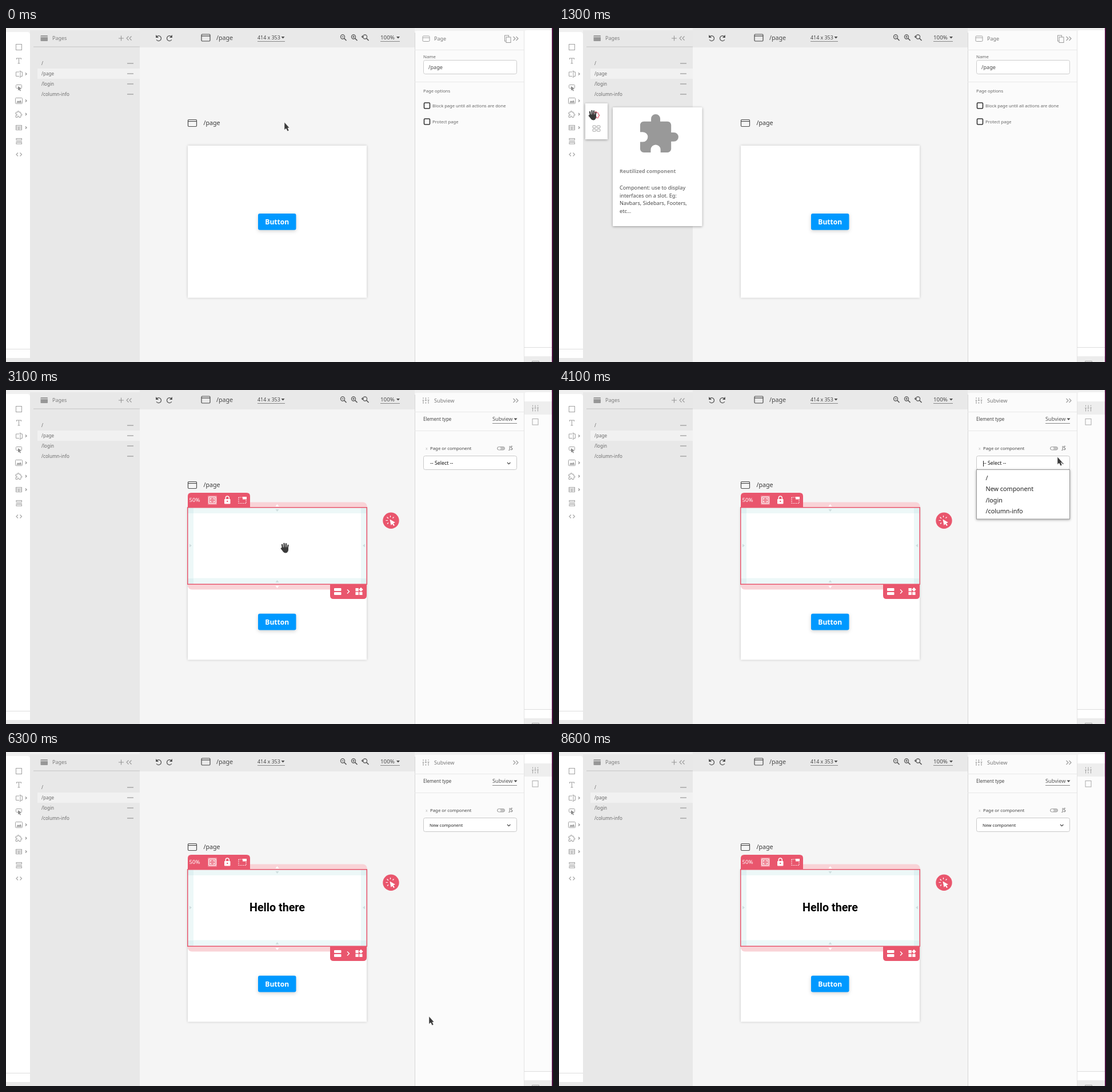
An HTML page for the animation above (9 s loop, 957 by 585 pixels).

```html
<!DOCTYPE html>
<html lang="en">
<head>
<meta charset="utf-8">
<title>Page builder</title>
<style>
  html, body { margin: 0; width: 100%; height: 100%; overflow: hidden; background: #f5f5f5; }
  svg { display: block; width: 100vw; height: 100vh; }
  text { font-family: "Noto Sans", "Open Sans", sans-serif; white-space: pre; }
  .card { filter: drop-shadow(0 0 2px rgba(0,0,0,.2)); }
  .pop { filter: drop-shadow(0 1px 2px rgba(0,0,0,.35)); }
  .lift { filter: drop-shadow(0 2px 3px rgba(0,0,0,.18)); }
</style>
</head>
<body>
<svg id="stage" viewBox="0 0 957 585"></svg>
<script>
const RED = '#e9566d', GRAY = '#a2a2a2', DARK = '#4a4a4a';
const LOOP = 9000, STEP = 100;

const rect = (x, y, w, h, fill, extra = '') =>
  `<rect x="${x}" y="${y}" width="${w}" height="${h}" fill="${fill}" ${extra}/>`;
const box = (x, y, w, h, stroke, sw = 1, extra = '') =>
  rect(x, y, w, h, 'none', `stroke="${stroke}" stroke-width="${sw}" ${extra}`);
const circle = (x, y, r, fill, extra = '') => `<circle cx="${x}" cy="${y}" r="${r}" fill="${fill}" ${extra}/>`;
const fillPath = (d, fill, extra = '') => `<path d="${d}" fill="${fill}" ${extra}/>`;
const line = (d, stroke = GRAY, sw = 1, extra = '') =>
  `<path d="${d}" fill="none" stroke="${stroke}" stroke-width="${sw}" ${extra}/>`;
const text = (x, y, size, str, fill = '#555', weight = 400, extra = '') =>
  `<text x="${x}" y="${y}" font-size="${size}" fill="${fill}" font-weight="${weight}" ${extra}>${str}</text>`;
const at = (x, y, body, scale = 1) => `<g transform="translate(${x} ${y}) scale(${scale})">${body}</g>`;
const group = (id, body) => `<g id="${id}">${body}</g>`;
const caret = (x, y) => fillPath(`M${x - 3} ${y - 1.5}h6l-3 3.5z`, DARK);

const PUZZLE = 'M20.5 11H19V7c0-1.1-.9-2-2-2h-4V3.5a2.5 2.5 0 0 0-5 0V5H4c-1.1 0-2 .9-2 2v3.8h1.5' +
  'a2.7 2.7 0 0 1 0 5.4H2V20c0 1.1.9 2 2 2h3.8v-1.5a2.7 2.7 0 0 1 5.4 0V22H17c1.1 0 2-.9 2-2v-4h1.5a2.5 2.5 0 0 0 0-5z';
const puzzle = (x, y, color) => at(x, y, line(PUZZLE, color, 2), .52);

const pageIcon = (x, y, w, h, color, sw = 1.2) =>
  box(x, y, w, h, color, sw, 'rx="1.5"') + line(`M${x} ${y + 3}h${w}`, color, sw);
const sliders = (x, y, color) => line(
  `M${x + 1} ${y}v2.5M${x + 1} ${y + 5}v6M${x + 5.5} ${y}v5.5M${x + 5.5} ${y + 8}v3M${x + 10} ${y}v2M${x + 10} ${y + 4.5}v6.5` +
  `M${x - .5} ${y + 5}h3M${x + 4} ${y + 5.5}h3M${x + 8.5} ${y + 4.5}h3`, color, 1);
const chevrons = (x, y, dir) =>
  line(`M${x} ${y - 3.5}l${3.5 * dir} 3.5l${-3.5 * dir} 3.5m${5 * dir} -7l${3.5 * dir} 3.5l${-3.5 * dir} 3.5`, '#999', 1.1);

function rail() {
  const more = y => line(`M34 ${y - 2}l2 2l-2 2`, '#888', 1.1);
  return rect(0, 0, 42, 585, '#f0f0f0') +
    fillPath('M0 7H37Q42 7 42 12V578H0z', '#fff') +
    line('M0 562.5H42', '#ddd') + rect(0, 578, 42, 7, '#e9e9e9') +
    box(17.5, 28.5, 10, 10, GRAY) +
    line('M18.5 55V53H26.5V55M22.5 53V62M20.5 62H24.5', GRAY, 1.1) +
    line('M23 77H17.5V84.5H23M25 75.5V86M23.5 75.5H26.5M23.5 86H26.5M26 77H28.5V84.5H26') + more(80.5) +
    box(17.5, 99.5, 10, 6, GRAY, 1, 'rx="1"') + fillPath('M21 102L27 106L24.5 107L26 110L24.5 110.5L23 108L21 109.5z', '#8c8c8c') +
    box(16.5, 122.5, 12, 10, GRAY, 1, 'rx="1"') + fillPath('M18 131L21 127L23 129L25 126L27.5 131z', GRAY) + more(127.5) +
    puzzle(16, 145, GRAY) + more(151) +
    box(17.5, 170.5, 10, 8, GRAY) + line('M17.5 173H27.5M17.5 175.7H27.5M22.5 173V178.5') + more(174.5) +
    box(18, 193.5, 9.5, 2.5, GRAY) + line('M17.5 198.5H28') + box(18, 200.5, 9.5, 2.5, GRAY) +
    line('M21 218.5L18 221.5L21 224.5M24.5 218.5L27.5 221.5L24.5 224.5', GRAY, 1.1);
}

function pagesPanel() {
  const rows = ['/', '/page', '/login', '/column-info'].map((name, i) => {
    const y = 62 + 18 * i;
    return (i === 1 ? rect(55, 71, 179, 18, '#f1f1f1') : '') +
      text(62, y + 3, 8.1, name, '#6c6c6c') + line(`M212 ${y}H223`, '#858585');
  }).join('');
  return rect(42, 0, 192, 585, '#e8e8e8') + rect(0, 0, 234, 4, '#f0f0f0') + rect(48, 32, 186, 2, '#d6d6d6') +
    rect(60.5, 13, 12.5, 10, '#979797', 'rx="1"') + line('M60.5 15.5H73', '#e8e8e8') +
    text(81, 21.3, 9, 'Pages', '#7c7c7c') + line('M197 18H206M201.5 13.5V22.5', '#959595', 1.1) +
    chevrons(219.5, 18, -1) + rows;
}

function toolbar() {
  const lens = (x, mark) => circle(x, 15.5, 3.6, 'none', `stroke="${DARK}" stroke-width="1.1"`) +
    line(`M${x + 2.5} 18l4 4`, DARK, 1.4) + line(mark, DARK, .9);
  const turn = line('M-3.3 -2.5A4.5 4.5 0 1 1 -3.8 3', DARK, 1.2) + fillPath('M-4.8 -5.5V-.5H0z', DARK);
  return rect(234, 0, 481, 34, '#e9e9e9') + at(267, 17.5, turn) +
    `<g transform="translate(286 17.5) scale(-1 1)">${turn}</g>` +
    pageIcon(342, 11, 15, 12, DARK) + text(368, 20.5, 10.7, '/page', DARK) +
    text(440, 20, 8.9, '414 x 353', DARK) + caret(484.5, 16.5) + line('M440 23.5H488', '#888') +
    lens(589, 'M587 15.5H591') + lens(608, 'M606 15.5H610M608 13.5V17.5') + lens(628, 'M626 15.5H622.5M624 13L622 15.5L624.5 17') +
    text(655, 20, 9.8, '100%', DARK) + caret(686, 16.5) + line('M655 23.5H689', '#888');
}

const panelBase = () =>
  rect(715, 0, 242, 585, '#f0f0f0') + fillPath('M715 9Q715 5 719 5H906V585H715z', '#fbfbfb') +
  fillPath('M906 9Q906 4 911 4H955V578H906z', '#fff') +
  line('M715.5 8V585', '#d6d6d6') + line('M906.5 5V585', '#e4e4e4') + line('M715 38.5H906', '#e8e8e8') +
  line('M906 559.5H955', '#ddd') + rect(907, 575, 48, 10, '#ececec') + line('M920.5 585V583.5H932.5V585', '#aaa') +
  chevrons(887.5, 18.5, 1);

function pagePanel() {
  const check = (y, label) => box(731.5, y - 5, 10, 10, '#333', 1.6, 'rx="1.5"') + text(746, y + 2.8, 7.6, label, '#666');
  return pageIcon(729, 14, 12, 9.5, '#a2a2a2', 1) + text(749, 22, 9, 'Page', '#777') +
    box(872.5, 13, 7, 10, '#999') + rect(875, 16, 8, 9.5, '#fbfbfb', 'stroke="#999"') +
    text(730, 52.5, 7.8, 'Name', '#666') + rect(730.5, 56.5, 163, 24, '#fff', 'stroke="#ccc" rx="3"') +
    text(739, 71.5, 9.2, '/page', DARK) + line('M715 94.5H906', '#e8e8e8') +
    text(730, 112.5, 7.7, 'Page options', '#666') +
    check(136, 'Block page until all actions are done') + check(164, 'Protect page');
}

function subviewPanel() {
  const options = ['/', 'New component', '/login', '/column-info'].map((s, i) =>
    text(746.5, 157.7 + 19.4 * i, 10.8, s, '#222', 500, `id="option${i}"`)).join('');
  return rect(907, 20, 48, 23, '#eeeeee') + rect(907, 43, 48, 516, '#fcfcfc') +
    sliders(920.5, 26.5, '#a2a2a2') + box(921, 50.5, 10, 10.5, '#aaa') +
    sliders(729, 13, '#999') + text(749, 22, 9.2, 'Subview', '#777') +
    text(730, 54, 8, 'Element type', '#444', 500) + text(851, 54.3, 9.2, 'Subview', '#555') +
    caret(891.5, 51) + line('M851 58.5H894', '#888') + line('M715 71.5H906', '#e8e8e8') +
    text(734, 104.5, 7, 'x', '#bbb') + text(742, 105, 7.8, 'Page or component', '#444', 500) +
    rect(859.5, 99.5, 13, 5.5, '#c4c4c4', 'rx="2.7" stroke="#a5a5a5"') +
    circle(863, 102.2, 2.3, '#fff') + text(880, 105, 8, 'JS', '#444') +
    rect(730.5, 115.5, 163, 24, '#fff', 'stroke="#c8c8c8" rx="3"') +
    text(742, 131.2, 8.8, '-- Select --', '#111', 500, 'id="placeholder"') +
    text(741, 131, 7.5, 'New component', '#222', 500, 'id="chosen"') +
    group('chevronDown', line('M877 127l2.7 2.7l2.7 -2.7', DARK, 1.3)) +
    group('chevronUp', line('M877 129.5l2.7 -2.7l2.7 2.7', DARK, 1.3)) +
    group('inputCaret', rect(742, 124, 1, 10, '#222')) +
    group('dropdown', rect(730.5, 139.5, 163, 86.5, '#fff', 'stroke="#9a9a9a" class="pop"') +
      rect(731, 183, 162, 19.4, '#5698fb', 'id="highlight"') + options);
}

function selection() {
  const tri = (x, y, dx, dy, fill) => dy
    ? fillPath(`M${x - 3} ${y}h6l-3 ${4 * dy}z`, fill) : fillPath(`M${x} ${y - 3}v6l${4 * dx} -3z`, fill);
  const tint = '#cfdedf';
  return rect(318, 196.5, 313.5, 153, '#f9d3d7', 'rx="7"') +
    rect(318, 206, 313, 134.5, '#edf8f8') + rect(328, 216, 293, 113.5, '#fff') +
    [[318, 206], [621, 206], [318, 330], [621, 330]].map(([x, y]) => rect(x, y, 10, 10, '#dff1f2')).join('') +
    tri(474.5, 204, 0, -1, '#fff') + tri(474.5, 209, 0, 1, tint) +
    tri(474.5, 337, 0, -1, tint) + tri(474.5, 343, 0, 1, '#fff') +
    tri(321, 272.5, 1, 0, tint) + tri(628, 272.5, -1, 0, tint) +
    group('hello', text(474.5, 279.2, 19.7, 'Hello there', '#000', 700,
      'text-anchor="middle" style="font-family:Roboto,sans-serif"')) +
    box(317.75, 205.75, 313.5, 134.5, RED, 1.5) +
    fillPath('M318 206V186Q318 180 324 180H421Q427 180 427 186V206z', RED) +
    text(320.5, 196.3, 9.7, '50%', '#fff') + rect(353, 185, 16, 16, '#f08a99', 'rx="1"') +
    box(354.8, 187.3, 12.4, 11.4, '#fff', 1.1, 'rx="1"') +
    line('M357.5 192V190H359.5M362.5 190H364.5V192M364.5 194V196H362.5M359.5 196H357.5V194', '#fff', 1.1) +
    rect(382, 191, 10.5, 8.5, '#fff', 'rx="1"') + line('M384.3 191V189A3 3 0 0 1 390.3 189V191', '#fff', 1.5) +
    circle(387.3, 195, 1.2, RED) +
    box(407, 188, 13, 10.5, '#fff', 1.2, 'stroke-dasharray="1.5 1.5"') + rect(414, 187, 7, 4.5, '#fff') +
    fillPath('M567 340H631V360Q631 366 625 366H573Q567 366 567 360z', RED) +
    rect(574, 347, 12.5, 5, '#fff', 'rx="1"') + rect(574, 354, 12.5, 5, '#fff', 'rx="1"') +
    line('M597 349.5l3.5 3.5l-3.5 3.5', '#fff', 1.4) +
    rect(611.5, 347, 5.3, 5.3, '#fff') + rect(611.5, 353.7, 5.3, 5.3, '#fff') + rect(618.2, 353.7, 5.3, 5.3, '#fff') +
    fillPath('M621 345.7l3.7 3.7l-3.7 3.7l-3.7 -3.7z', '#fff') +
    circle(673.5, 228.7, 14.2, RED) +
    fillPath('M671.5 226.5L681 232L677.5 233.5L680 237L678 238L676 234.5L673.5 237z', '#fff') +
    line('M672.5 220V223M666.5 222.5L669 225M664.5 228.5H668M667 234.5L669 232.5M678.5 222.5L676.5 224.5', '#fff', 1.2);
}

const canvasArea = () =>
  pageIcon(318.5, 160.5, 15, 12, DARK) + text(345.5, 170, 10.7, '/page', '#3a3a3a') +
  rect(318, 206, 313, 266.5, '#fff', 'class="card"') +
  group('dropBar', rect(318, 206, 313, 7.5, '#ff9a3c')) + group('selection', selection()) +
  group('button', rect(441, 325, 66.5, 28.7, '#0099ff', 'rx="3" class="lift"') +
    text(474.3, 344, 12.1, 'Button', '#fff', 700, 'text-anchor="middle"'));

function popups() {
  const copy = ['Component: use to display', 'interfaces on a slot. Eg:', 'Navbars, Sidebars, Footers,', 'etc...'];
  const tiles = [[59, 171], [66.5, 171], [59, 177], [66.5, 177]].map(([x, y]) => box(x, y, 5.5, 4, GRAY, 1, 'rx="1"')).join('');
  return group('menu', rect(46, 132, 39, 63, '#fff', 'class="pop"') +
      group('pieceIdle', puzzle(59, 146, GRAY)) + group('pieceHot', puzzle(59, 146, RED)) + tiles) +
    group('tip', rect(94, 139, 156.5, 208, '#fff', 'class="pop" rx="1"') +
      at(135.6, 147.8, fillPath(PUZZLE, '#999'), 3.19) +
      text(106, 254.3, 9, 'Reutilized component', '#8a8a8a', 700) +
      copy.map((s, i) => text(106, 283 + 13.7 * i, 9.2, s, DARK)).join(''));
}

function cursors() {
  const ink = '#3a3a3a', round = 'stroke-linecap="round" stroke-linejoin="round"';
  const solid = d => fillPath(d, ink, `stroke="${ink}" ${round}`);
  return group('arrow', fillPath('M0 0V13.5L3 11L5.5 15.8L8 14.6L5.8 10H9z', ink, 'stroke="#fff" stroke-width=".5"')) +
    group('open', line('M4 9.5L3 4M7 9L6.5 2M9.8 9L10 2.5M12.5 10L13.5 5', ink, 2.3, round) +
      solid('M4 9H13.5V13Q13 18 9 18Q6 18 4 14.5L1 10.5L2 9.5z')) +
    group('closed', rect(-6, -7, 15, 14, '#fff', 'opacity=".75"') + puzzle(-6.5, -7, '#bbb') +
      line('M3.5 7V5M6 7V4M8.5 7V4.5M11 7V5.5', ink, 2.4, round) +
      solid('M2.5 6H12V11Q11 15 7.5 15Q4.5 15 3 12.5L.5 9L1 8z')) +
    group('pointer', solid('M3 1Q4.5 0 5 2L5.5 5.5L11 7Q12.5 8 12.3 10L11.5 15H5L1 9.5Q1.5 8 3.5 9z'));
}

document.getElementById('stage').innerHTML =
  rect(0, 0, 957, 585, '#f5f5f5') + pagesPanel() + rail() + toolbar() + canvasArea() + panelBase() +
  group('pagePanel', pagePanel()) + group('subviewPanel', subviewPanel()) + rect(955, 0, 2, 585, '#4c0f3f') +
  popups() + group('cursor', cursors());

// Waypoints: time, x, y
const PATH = [
  [0, 487, 165], [100, 433, 152], [200, 433, 152], [400, 215, 108], [600, 50, 146], [700, 50, 146],
  [800, 20, 149], [1000, 45, 148], [1300, 51, 143], [1700, 56, 145], [1800, 90, 155], [2200, 445, 207],
  [2500, 470, 211], [2700, 470, 211], [3100, 480, 267], [3300, 540, 240], [3700, 743, 106], [3900, 872, 117],
  [4100, 872, 117], [4400, 788, 192], [4600, 783, 187], [4900, 784, 171], [5700, 784, 171],
  [6000, 738, 358], [6100, 738, 358], [6300, 740, 463], [7100, 740, 463], [7500, 861, 300], [7900, 800, 87],
  [8100, 683, 159], [8200, 402, 72], [8300, 402, 72], [8500, 38, 3], [9000, 38, 3]
];
// Visible spans: id -> [from, to]
const SPANS = {
  menu: [600, 1800], tip: [1000, 1800], pieceIdle: [600, 1000], pieceHot: [1000, 1800],
  dropBar: [2200, 2800], selection: [2800, LOOP], pagePanel: [0, 2800], subviewPanel: [2800, LOOP],
  dropdown: [4100, 5600], highlight: [4300, 5600], chevronUp: [4100, 5800],
  placeholder: [2800, 5800], chosen: [5800, LOOP], hello: [5800, LOOP], cursor: [0, 8600]
};
const KINDS = [[0, 'arrow'], [1000, 'open'], [1800, 'closed'], [2800, 'open'], [3400, 'arrow'], [4200, 'pointer'], [5700, 'arrow']];

const el = id => document.getElementById(id);
const show = (id, on) => { el(id).style.display = on ? '' : 'none'; };

function position(t) {
  const i = PATH.findIndex(p => p[0] > t);
  const [t0, x0, y0] = PATH[i - 1], [t1, x1, y1] = PATH[i];
  const k = (t - t0) / (t1 - t0);
  return [x0 + (x1 - x0) * k, y0 + (y1 - y0) * k];
}

function render(t) {
  for (const [id, [from, to]] of Object.entries(SPANS)) show(id, t >= from && t < to);
  show('chevronDown', t < 4100 || t >= 5800);
  show('inputCaret', t >= 4100 && t < 5600 && Math.floor((t - 4100) / 500) % 2 === 0);
  const kind = KINDS.filter(k => k[0] <= t).pop()[1];
  ['arrow', 'open', 'closed', 'pointer'].forEach(id => show(id, id === kind));
  el('cursor').setAttribute('transform', `translate(${position(t).join(' ')})`);
  el('button').setAttribute('transform', `translate(0 ${t >= 2800 ? 66.7 : 0})`);

  const hovered = t < 4300 || t >= 5600 ? -1 : t < 4400 || t >= 4800 ? 1 : 2;
  el('highlight').setAttribute('y', 144.2 + 19.4 * Math.max(hovered, 0));
  for (let i = 0; i < 4; i++) el('option' + i).setAttribute('fill', i === hovered ? '#fff' : '#222');
}

function tick() {
  render(Math.floor(performance.now() % LOOP / STEP) * STEP);
  requestAnimationFrame(tick);
}
tick();
</script>
</body>
</html>
```
